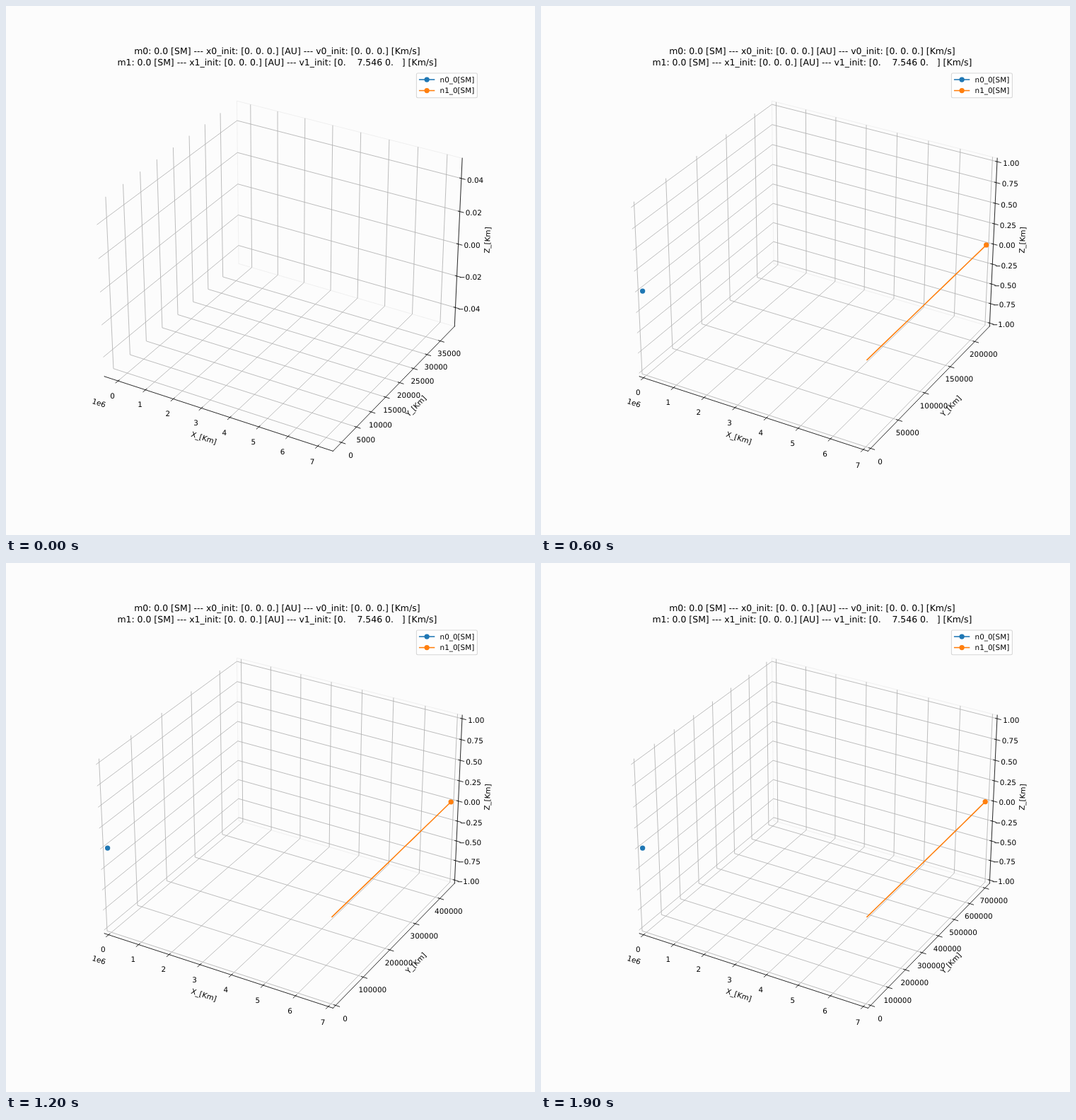
These frames come from a looping animation (748 by 748 pixels, 2000 ms). An HTML page with a canvas:

```html
<!DOCTYPE html>
<html lang="en">
<head>
<meta charset="utf-8">
<title>Two-body orbit</title>
<style>
  html, body { margin: 0; width: 100%; height: 100%; overflow: hidden; background: #fcfcfc; }
  canvas { display: block; }
</style>
</head>
<body>
<canvas width="748" height="748"></canvas>
<script>
const ctx = document.querySelector('canvas').getContext('2d');
const PT = 74.8 / 72;              // pixels per typographic point
const EM = 10 * PT;
const BLUE = '#1f77b4', ORANGE = '#ff7f0e';

// Positions are fractions of the axis limits; panes reach a little beyond them.
const LO = -1 / 48, HI = 1 + 1 / 48, DELTA = 1 / 12;
const SIDES = [8 / 7, 8 / 7, 6 / 7];
const DISTANCE = 10;
const VIEW = { left: 95.37, bottom: 665.72, scale: 575.96 / 0.185, shift: 0.095 };

const AXES = [
  { title: 'X_[Km]', start: [LO, LO, LO], tickDir: 1, out: -1,
    grid: [[0, LO, LO], [0, HI, LO], [0, HI, HI]], format: v => String(v / 1e6) },
  { title: 'Y_[Km]', start: [HI, LO, LO], tickDir: 0, out: 1,
    grid: [[HI, 0, LO], [LO, 0, LO], [LO, 0, HI]], format: v => String(v) },
  { title: 'Z_[Km]', start: [HI, HI, LO], tickDir: 0, out: 1,
    grid: [[LO, LO, 0], [LO, HI, 0], [HI, HI, 0]],
    format: v => v.toFixed(2).replace('-', '\u2212') }
];

// Circular orbit in metres, sampled every five seconds.
const RADIUS = 7e6, SPEED = 7546, TIME_STEP = 5;
function orbit(step) {
  const angle = SPEED * TIME_STEP * step / RADIUS;
  return [RADIUS * Math.cos(angle), RADIUS * Math.sin(angle), 0];
}

// Perspective camera at elevation 30 and azimuth -60 degrees.
function project(point) {
  const [x, y, z] = point.map((f, i) => (f - 0.5) * SIDES[i]);
  const c = Math.sqrt(3) / 2;
  const depth = DISTANCE - (c / 2 * x - 0.75 * y + z / 2);
  const u = (c * x + y / 2) / depth;
  const v = (-x / 4 + c / 2 * y + c * z) / depth;
  return [VIEW.left + (u + VIEW.shift) * VIEW.scale,
          VIEW.bottom - (v + VIEW.shift) * VIEW.scale];
}

const replaceAt = (point, index, value) => point.map((p, i) => i === index ? value : p);
const moveOut = (point, index, amount) =>
  point.map((p, i) => i === index ? p : p + Math.sign(p - 0.5) * amount * DELTA);

function limitsAt(step) {
  if (step === 0) {
    const padded = max => [-0.05 * max, 1.05 * max];
    return [padded(RADIUS), padded(orbit(1)[1]), [-0.05, 0.05]];
  }
  return [[0, RADIUS], [0, orbit(step)[1]], [-1, 1]];
}

function ticks([min, max]) {
  const raw = (max - min) / 9;
  const power = 10 ** Math.floor(Math.log10(raw));
  const size = power * [1, 2, 2.5, 5, 10].find(m => m * power >= raw);
  const values = [];
  for (let n = Math.ceil(min / size); n * size <= max; n++) values.push(n * size);
  return values;
}

function line(points, color, width, cap = 'square') {
  ctx.beginPath();
  points.forEach(([x, y]) => ctx.lineTo(x, y));
  ctx.strokeStyle = color;
  ctx.lineWidth = width * PT;
  ctx.lineCap = cap;
  ctx.lineJoin = 'round';
  ctx.stroke();
}

function dot([x, y], color) {
  ctx.beginPath();
  ctx.arc(x, y, 3.5 * PT, 0, 2 * Math.PI);
  ctx.fillStyle = color;
  ctx.fill();
}

function text(string, [x, y], { size = 10, align = 'center', angle = 0, drop = 0 } = {}) {
  ctx.save();
  ctx.translate(x, y);
  ctx.rotate(angle);
  ctx.font = `${size * PT}px "DejaVu Sans", sans-serif`;
  ctx.textRendering = 'geometricPrecision';
  ctx.textAlign = align;
  ctx.fillStyle = '#000';
  ctx.fillText(string, 0, drop);
  ctx.restore();
}

function drawAxis(axis, index, limits) {
  const [min, max] = limits;
  const marks = ticks(limits).map(value => ({ value, f: (value - min) / (max - min) }));
  const ends = [axis.start, replaceAt(axis.start, index, HI)].map(project);
  const angle = Math.atan2(ends[1][1] - ends[0][1], ends[1][0] - ends[0][0]);

  for (const { f } of marks)
    line(axis.grid.map(p => project(replaceAt(p, index, f))), '#b0b0b0', 0.8, 'butt');

  line(ends, '#000', 0.8);
  const middle = moveOut(replaceAt(axis.start, index, 0.5), index, 1.0823);
  text(axis.title, project(middle), { angle, drop: 0.262 * EM });
  if (max >= 1e6)
    text('1e6', project(moveOut(axis.start, index, 1.0823)),
         { angle, align: 'left', drop: 0.277 * EM });

  for (const { value, f } of marks) {
    const base = replaceAt(axis.start, index, f);
    const tickEnd = reach =>
      project(replaceAt(base, axis.tickDir, base[axis.tickDir] + axis.out * reach * DELTA));
    line([tickEnd(-0.1), tickEnd(0.2)], '#000', 0.8);
    text(axis.format(value), project(moveOut(base, index, 0.4978)), { drop: 0.79 * EM });
  }
}

function drawLegend() {
  ctx.beginPath();
  ctx.roundRect(580.4, 95, 86, 34.8, 2);
  ctx.fillStyle = 'rgba(255,255,255,.8)';
  ctx.fill();
  ctx.strokeStyle = 'rgba(204,204,204,.8)';
  ctx.lineWidth = PT;
  ctx.stroke();
  [['n0_0[SM]', BLUE], ['n1_0[SM]', ORANGE]].forEach(([label, color], row) => {
    const y = 104.1 + 15.5 * row;
    line([[584.7, y], [605.5, y]], color, 1.5);
    dot([595.1, y], color);
    text(label, [613.6, y + 3.7], { align: 'left' });
  });
}

function draw(step) {
  ctx.fillStyle = '#fcfcfc';
  ctx.fillRect(0, 0, 748, 748);

  const limits = limitsAt(step);
  const backWall = [[LO, HI, LO], [LO, HI, HI], [HI, HI, HI], [HI, HI, LO], [LO, HI, LO]];
  line(backWall.map(project), '#f0f0f0', 1);
  AXES.forEach((axis, i) => drawAxis(axis, i, limits[i]));

  if (step > 0) {
    const place = p => project(p.map((v, i) => (v - limits[i][0]) / (limits[i][1] - limits[i][0])));
    const trail = Array.from({ length: step + 1 }, (_, i) => place(orbit(i)));
    dot(place([0, 0, 0]), BLUE);
    line(trail, ORANGE, 1.5);
    dot(trail[step], ORANGE);
  }

  text('m0: 0.0 [SM] --- x0_init: [0. 0. 0.] [AU] --- v0_init: [0. 0. 0.] [Km/s]',
       [383.35, 68], { size: 12 });
  text('m1: 0.0 [SM] --- x1_init: [0. 0. 0.] [AU] --- v1_init: [0.    7.546 0.   ] [Km/s]',
       [383.35, 83.5], { size: 12 });
  drawLegend();
}

function animate() {
  draw(Math.floor(performance.now() % 2000 / 100));
  requestAnimationFrame(animate);
}
animate();
</script>
</body>
</html>
```
